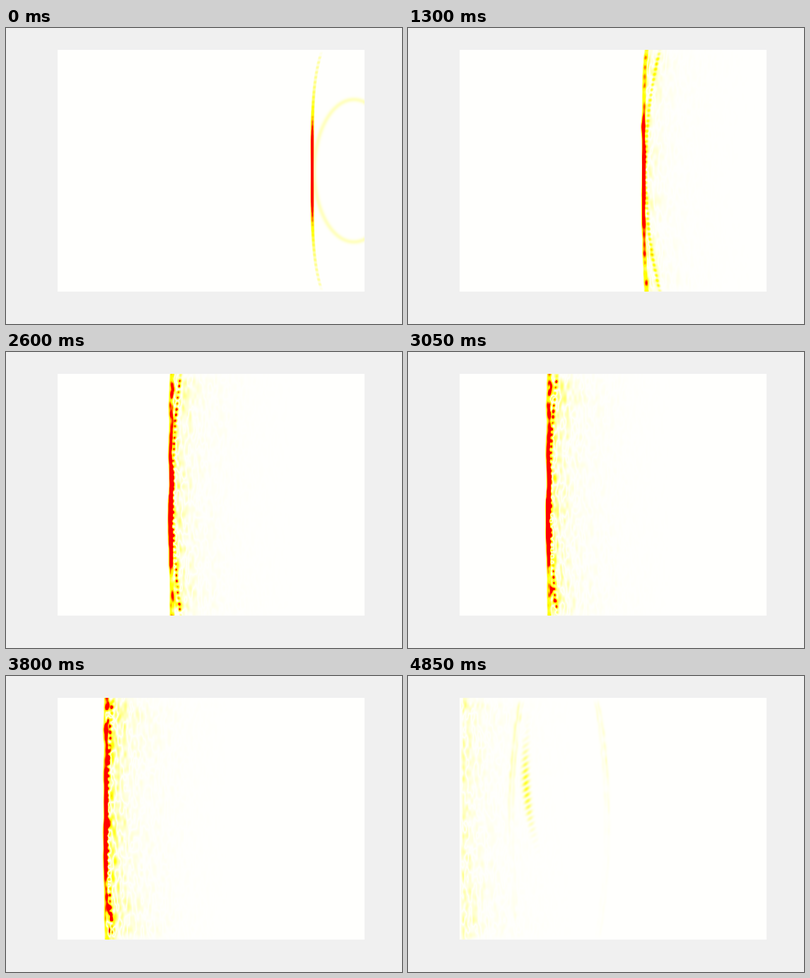
Write an HTML page with a canvas that moves like this. It is 560 by 420 pixels and loops after 4.9 s.

```html
<!DOCTYPE html>
<html lang="en">
<head>
<meta charset="utf-8">
<title>Wave front</title>
<style>
  html, body { margin: 0; width: 100%; height: 100%; overflow: hidden; background: #f0f0f0; }
  canvas { position: absolute; left: 73px; top: 31px; }
</style>
</head>
<body>
<canvas id="plot" width="434" height="343"></canvas>
<script>
const LOOP = 4900, STEP = 50;
const LEFT = 73, TOP = 31, W = 434, H = 343, MID = 202.5;
const SPEED = 0.0769; // px per ms

const ctx = document.getElementById('plot').getContext('2d');
const image = ctx.createImageData(W, H);
const px = image.data;

const clamp = v => Math.max(0, Math.min(1, v));
const ramp = (a, b, v) => { const k = clamp((v - a) / (b - a)); return k * k * (3 - 2 * k); };
const bell = (d, s) => Math.exp(-d * d / (2 * s * s));
const wave = (v, period) => Math.cos(v * 2 * Math.PI / period);

// Seeded lattice for smooth signed noise
const N = 256;
const lattice = new Float32Array(N * N);
let seed = 20117;
for (let i = 0; i < lattice.length; i++) {
  seed = (Math.imul(seed, 1664525) + 1013904223) >>> 0;
  lattice[i] = seed / 2147483648 - 1;
}

function noise(x, y) {
  const x0 = Math.floor(x), y0 = Math.floor(y);
  let u = x - x0, v = y - y0;
  u *= u * (3 - 2 * u);
  v *= v * (3 - 2 * v);
  const a = x0 & 255, b = (x0 + 1) & 255;
  const r = (y0 & 255) * N, q = ((y0 + 1) & 255) * N;
  const top = lattice[r + a] + (lattice[r + b] - lattice[r + a]) * u;
  const low = lattice[q + a] + (lattice[q + b] - lattice[q + a]) * u;
  return top + (low - top) * v;
}

// Approximate signed distance from an ellipse, in px
function ringDistance(dx, dy, rx, ry) {
  const a = dx / rx, b = dy / ry;
  const f = Math.sqrt(a * a + b * b);
  if (Math.abs(f - 1) > 0.4) return 99;
  return (f - 1) * f / Math.hypot(a / rx, b / ry);
}

// White to yellow to red
function paint(i, v) {
  px[i] = 255;
  px[i + 1] = 255 * clamp(1 - (v - 0.5) / 0.28);
  px[i + 2] = 253 * clamp(1 - v / 0.42);
  px[i + 3] = 255;
}

function draw(t) {
  const front = 433 - SPEED * t;
  const grown = clamp(t / 1500);
  const bend = 1 + 11 * Math.exp(-t / 900);
  const scatter = Math.pow(t / 4450, 1.2) * (1 - 0.4 * ramp(4500, 4850, t));
  const drift = t * 0.0016;

  const arcX = 56 + SPEED * t, arcY = 101 + 0.19 * t;
  const arcGain = Math.min(0.85, 0.1 + 0.00033 * t);
  const arcWidth = 1.6 + 0.7 * (1 - grown);

  const echoOn = ramp(4150, 4400, t) * (1 - 0.4 * ramp(4450, 4850, t));
  const echoMid = 222 - 0.021 * (t - 4450);
  const echoX = 32 + 0.096 * (t - 4450), echoY = 150 + 0.325 * (t - 4450);
  const streakOn = ramp(4480, 4850, t);

  for (let row = 0; row < H; row++) {
    const y = row + TOP + 0.5, dy = y - MID;
    const edge = Math.abs(dy) / 165;
    const margin = ramp(0, 14, row) * ramp(0, 14, H - row);

    // Strength of the leading front on this row
    const coreY = (dy - 7 * grown) / (75 + 12 * grown);
    const core = Math.exp(-coreY * coreY);
    const n1 = 0.5 + 0.5 * noise(t / 1400 + 7, y / 19);
    const n2 = 0.5 + 0.5 * noise(t / 1200 + 40, y / 20 + 60);
    const dash = 1 - (1 - core) * 0.4 * (1 - 0.6 * grown) * (1 - wave(y, 7 + 8 * grown));
    const strength = (1.3 * core * (1 - 0.55 * grown * n1 * n1)
      + (0.14 + 0.6 * grown * (0.3 + 0.8 * n2)) * dash * (1 - 0.6 * core))
      * (1 - (1 - margin) * (1 - grown));
    const rowFront = front + bend * Math.pow(edge, 4)
      + 1.2 * grown * noise(t / 2500 + 20, y / 36);
    const pinch = 0.35 * (1 - grown) * bell(dy, 16);
    const frontWidth = 2.2 + grown * n2 * 0.9 + 0.4 * clamp(t / 3000) - pinch;

    const dots = 1 - 0.42 * grown * (1 - wave(y, 6.5 + t / 1600));
    const arcRow = arcGain * dots * (1 - 0.3 * grown * (1 - n2)) * (0.3 + 0.7 * margin);
    const ends = (0.7 + 0.4 * edge * edge) * (0.3 + 0.7 * margin);
    const echoRow = echoOn * (0.03 + 0.15 * (1 - ramp(90, 250, y))) * margin;
    const streakMid = 166 + 9 * Math.pow((y - 125) / 90, 2) + (4850 - t) * 0.05;
    const streakRow = streakOn * 0.36 * bell(y - 156, 34);

    for (let col = 0; col < W; col++) {
      const x = col + LEFT + 0.5, d = x - rowFront;
      let u = 0;

      if (Math.abs(d) < 7) u += strength * Math.exp(-Math.pow(d / frontWidth, 4));

      const ring = ringDistance(x - 492, dy, arcX, arcY);
      if (Math.abs(ring) < 9) u += arcRow * bell(ring, arcWidth);

      if (d > -2 && d < 170 && scatter > 0) {
        const rise = clamp((d + 2) / 5) * clamp((col - 1) / 4);
        const fine = noise(d / 3.4 + 11, y / 8 + drift) + noise(d / 3.9 + 90, y / 10 - drift);
        const broad = noise(d / 4.5 + 150, y / 19 + drift * 0.5);
        const near = 1.2 * Math.exp(-d / 9), far = 0.3 * Math.exp(-d / 36);
        u += scatter * rise * ends * (near * (0.5 * fine + 0.8 * broad)
          + far * (0.5 * fine + 0.6 * broad));
      }

      if (echoOn > 0) {
        const e = ringDistance(x - echoMid, y - 207, echoX, echoY);
        if (Math.abs(e) < 12) {
          const side = x < echoMid ? 1.1 : 0.65;
          u += echoRow * side * (bell(e, 1.6) + 0.6 * bell(e + 5, 1.6))
            * (0.75 + 0.6 * noise(x / 4, y / 10));
        }
        const s = x - streakMid;
        if (Math.abs(s) < 12) u += streakRow * bell(s, 3.4) * (0.6 + 0.4 * wave(y + x * 0.6, 9));
      }

      paint((row * W + col) * 4, Math.abs(u));
    }
  }
  ctx.putImageData(image, 0, 0);
}

const start = performance.now();
let shown = -1;
function tick() {
  const t = Math.floor(((performance.now() - start) % LOOP) / STEP) * STEP;
  if (t !== shown) draw(shown = t);
  requestAnimationFrame(tick);
}
tick();
</script>
</body>
</html>
```
